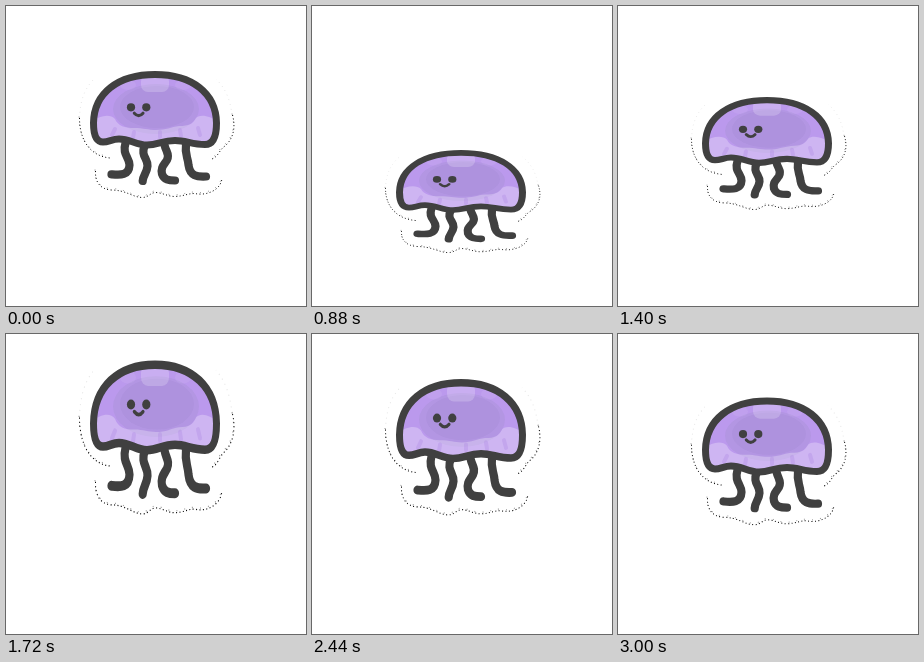
Animation, 300 px wide and 300 px high, one loop 3040 ms. Source, as an HTML page:

```html
<!DOCTYPE html>
<html lang="en">
<head>
<meta charset="utf-8">
<title>Jellyfish</title>
<style>
  html, body { margin: 0; width: 100%; height: 100%; overflow: hidden; background: #fff; }
  svg { display: block; width: 100vw; height: 100vh; }
  .line { fill: none; stroke: #404040; stroke-linecap: round; stroke-linejoin: round; }
  .dots { fill: none; stroke: #000; stroke-width: 1; }
</style>
</head>
<body>
<svg viewBox="0 0 300 300">
  <defs>
    <path id="bell" d="M87.500 117C88 87 112 68.500 149 68.500S210 87 210.500 117C210.500 130 208 138.500 199 138.500C186 138.500 180 134.500 169 134.500C156 134.500 152 139 141 139C130 139 124 133 113 133C106 133 103 136 97 136C89 136 87.500 127 87.500 117Z"/>
    <clipPath id="inside"><use href="#bell"/></clipPath>
    <path id="edge" d="M73.500 112C73.500 134 84 150 104 152M89.500 165C89 176 94 183 105 184C120 184 126 191 136 191.500C143 191.500 144 186.500 150 186.500C157 187 162 190.500 169 190.500C179 190 181 187.500 189 187.500C199 190 215 185 216 172M226.500 109C230 122 227 133 219 140C213 144 213 150 206 153"/>
  </defs>
  <g id="jelly">
    <path class="dots" d="M73.500 112C74 94 79 82 88 73M226 109C224 92 219 82 210 73" stroke-dasharray="1 4" opacity=".1"/>
    <use class="dots" href="#edge" stroke-dasharray="1 2.400"/>
    <use class="dots" href="#edge" stroke-dasharray="1 7" transform="translate(-.5 -1.500)" opacity=".4"/>

    <g class="line" stroke-width="8.200">
      <path d="M119.500 137C116 149 123.500 151 123.500 159C123 170 114 169 105.500 168.300"/>
      <path d="M139 139C134 150 142 152 141.500 160C141 167 137 169 136.700 175"/>
      <path d="M158.500 139C160 146 164 148 161 154C158 159 154.500 161 156 168C158 174 163 174.500 169 174.500"/>
      <path d="M180 138C178.500 149 182 151 182.500 159C184 170 191 171 200 170.500"/>
    </g>

    <g clip-path="url(#inside)">
      <path d="M80 60H220V150H80Z" fill="#bb99ed"/>
      <ellipse cx="150" cy="103" rx="43" ry="25" fill="#b396e3"/>
      <ellipse cx="151" cy="101" rx="37" ry="21" fill="#ae92de"/>
      <g fill="#fff">
        <path d="M86 116C92 110 104 107 109 113C112 120 119 122 128 122C138 122 142 124 150 124C160 124 165 121 173 120C183 120 187 118 190 112C195 107 206 111 212 116V145H86Z" opacity=".27"/>
        <rect x="135" y="68" width="28" height="18" rx="7" opacity=".2"/>
        <ellipse cx="122" cy="79" rx="8" ry="5" opacity=".07"/>
        <ellipse cx="177" cy="79" rx="8" ry="5" opacity=".07"/>
      </g>
      <path class="line" d="M109 123L106 129M128 126L127 132M154 126V131M174 124L175 130M192 122L194 129" stroke-width="4" style="stroke:#a882e0" opacity=".3"/>
    </g>
    <use class="line" href="#bell" stroke-width="7"/>

    <g fill="#404040">
      <circle cx="125" cy="101.300" r="4.100"/>
      <circle cx="140.300" cy="101.300" r="4.100"/>
    </g>
    <path class="line" d="M128.300 107.200Q132.700 112 137 107.200" stroke-width="3.100"/>
  </g>
</svg>
<script>
  const LOOP = 3040, STEP = 40, TOP = 65, HEIGHT = 127;
  // time, top edge, bottom edge
  const keys = [
    [0, 65, 192], [480, 97, 215], [560, 105.5, 221], [880, 144, 247],
    [1100, 157, 258], [1400, 91, 204], [1690, 26.8, 181], [1800, 26, 180],
    [2240, 35, 180], [2440, 45, 181.5], [2800, 57.7, 188], [3000, 63.5, 191.3]
  ];
  const n = keys.length;

  // Keys wrap around the loop in both directions.
  function key(i) {
    const turn = Math.floor(i / n);
    const [t, top, bottom] = keys[i - turn * n];
    return [t + turn * LOOP, top, bottom];
  }

  // Slope is flat at turning points, so the curve never overshoots.
  function slope(i, c) {
    const a = key(i - 1), b = key(i), d = key(i + 1);
    const before = (b[c] - a[c]) / (b[0] - a[0]);
    const after = (d[c] - b[c]) / (d[0] - b[0]);
    return before * after <= 0 ? 0 : 2 * before * after / (before + after);
  }

  function sample(t, c) {
    let i = n - 1;
    while (keys[i][0] > t) i--;
    const a = key(i), b = key(i + 1), span = b[0] - a[0];
    const u = (t - a[0]) / span, v = 1 - u;
    return v * v * (1 + 2 * u) * a[c] + u * u * (1 + 2 * v) * b[c]
      + span * u * v * (v * slope(i, c) - u * slope(i + 1, c));
  }

  const jelly = document.getElementById("jelly");
  const start = performance.now();

  function draw() {
    const elapsed = performance.now() - start;
    const t = Math.floor(elapsed % LOOP / STEP) * STEP;
    const top = sample(t, 1);
    const scale = (sample(t, 2) - top) / HEIGHT;
    jelly.setAttribute("transform", `translate(0 ${top}) scale(1 ${scale}) translate(0 ${-TOP})`);
    requestAnimationFrame(draw);
  }
  draw();
</script>
</body>
</html>
```
